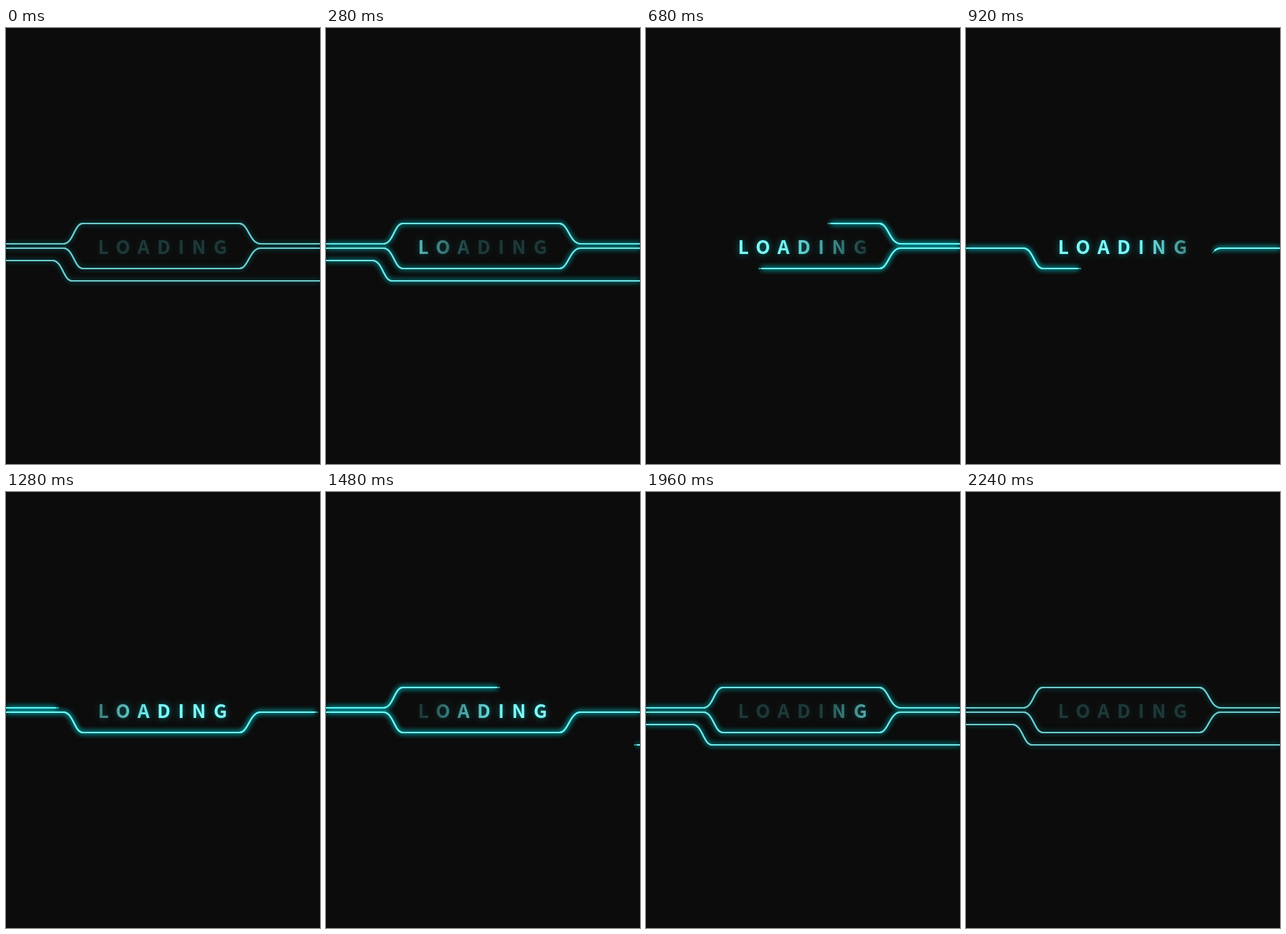
Recreate the animation shown at these times as an HTML page with a canvas. Size 433 px wide and 600 px high, loop 2.4 s.

```html
<!DOCTYPE html>
<html lang="en">
<head>
<meta charset="utf-8">
<title>Loading</title>
<style>
  html, body { margin: 0; width: 100%; height: 100%; overflow: hidden; background: #0c0c0c; }
  canvas { display: block; }
</style>
</head>
<body>
<canvas width="433" height="600"></canvas>
<script>
const LOOP = 2400, STEP = 40;
const ctx = document.querySelector('canvas').getContext('2d');

const clamp = v => Math.min(1, Math.max(0, v));
const ramp = (t, [from, to]) => clamp((t - from) / (to - from));

// Each wire is wiped out from its start, then drawn again in the same direction.
const wire = (d, erase, draw) => {
  const el = document.createElementNS('http://www.w3.org/2000/svg', 'path');
  el.setAttribute('d', d);
  return { path: new Path2D(d), length: el.getTotalLength(), erase, draw };
};
const wires = [
  wire('M0 297H79C93 297 94 269 106 269H322C334 269 336 297 351 297H433', [387, 897], [1199, 1709]),
  wire('M0 303H79C93 303 94 331 106 331H322C334 331 336 303 351 303H433', [473, 1037], [702, 1284]),
  wire('M433 348H91C79 348 78 320 64 320H0', [283, 609], [1474, 1802])
];

// Linear interpolation through [time, value] points
function track(t, points) {
  let i = 1;
  while (i < points.length - 1 && t > points[i][0]) i++;
  const [t0, v0] = points[i - 1], [t1, v1] = points[i];
  return v0 + (v1 - v0) * ramp(t, [t0, t1]);
}
const litEdge = [[40, 60], [480, 203], [920, 290], [1160, 370]];
const dimEdge = [[1040, 65], [1280, 150], [1480, 192], [1760, 248], [2240, 370]];

function strokePart(path, from, to, width) {
  if (to <= from) return;
  ctx.lineWidth = width;
  ctx.setLineDash([to - from, 2000]);
  ctx.lineDashOffset = -from;
  ctx.stroke(path);
}

function drawWire({ path, length, erase, draw }, t, power) {
  const tail = ramp(t, erase) * length, head = ramp(t, draw) * length;
  const tailTip = tail > 0 ? 4 : 0, headTip = head < length ? 4 : 0;
  ctx.strokeStyle = `rgb(110, ${200 + 48 * power}, ${203 + 45 * power})`;
  ctx.shadowBlur = 7;
  for (const glow of [0.55 + 0.45 * power, power]) {
    ctx.shadowColor = `rgba(0, 225, 230, ${glow})`;
    strokePart(path, tail + tailTip, length, 2);
    strokePart(path, 0, head - headTip, 2);
  }
  // Thin tips at the moving ends
  ctx.shadowColor = 'transparent';
  strokePart(path, tail, tail + tailTip, 1);
  strokePart(path, Math.max(0, head - headTip), head, 1);
}

function drawText(t) {
  const lit = track(t, litEdge), dim = track(t, dimEdge);
  const left = 120, width = 195, soft = 120, stops = 30;
  const fill = ctx.createLinearGradient(left, 0, left + width, 0);
  for (let i = 0; i <= stops; i++) {
    const x = left + width * i / stops;
    const level = Math.min(clamp((lit - x) / soft + 0.5), clamp((x - dim) / soft + 0.5));
    fill.addColorStop(i / stops, `rgba(125, 252, 252, ${0.16 + 0.84 * level})`);
  }
  ctx.font = 'bold 26px "Noto Sans CJK JP", "Noto Sans CJK SC", "Noto Sans CJK", "Open Sans", sans-serif';
  ctx.letterSpacing = '10.4px';
  ctx.fillStyle = fill;
  ctx.shadowColor = 'rgba(0, 210, 215, 0.6)';
  ctx.shadowBlur = 9;
  ctx.fillText('LOADING', 126.7, 311);
}

function frame(now) {
  const t = Math.floor(now % LOOP / STEP) * STEP;
  const power = Math.min(ramp(t, [40, 440]), 1 - ramp(t, [1780, 2240]));
  ctx.shadowColor = 'transparent';
  ctx.fillStyle = '#0c0c0c';
  ctx.fillRect(0, 0, 433, 600);
  for (const w of wires) drawWire(w, t, power);
  drawText(t);
  requestAnimationFrame(frame);
}
frame(performance.now());
</script>
</body>
</html>
```
